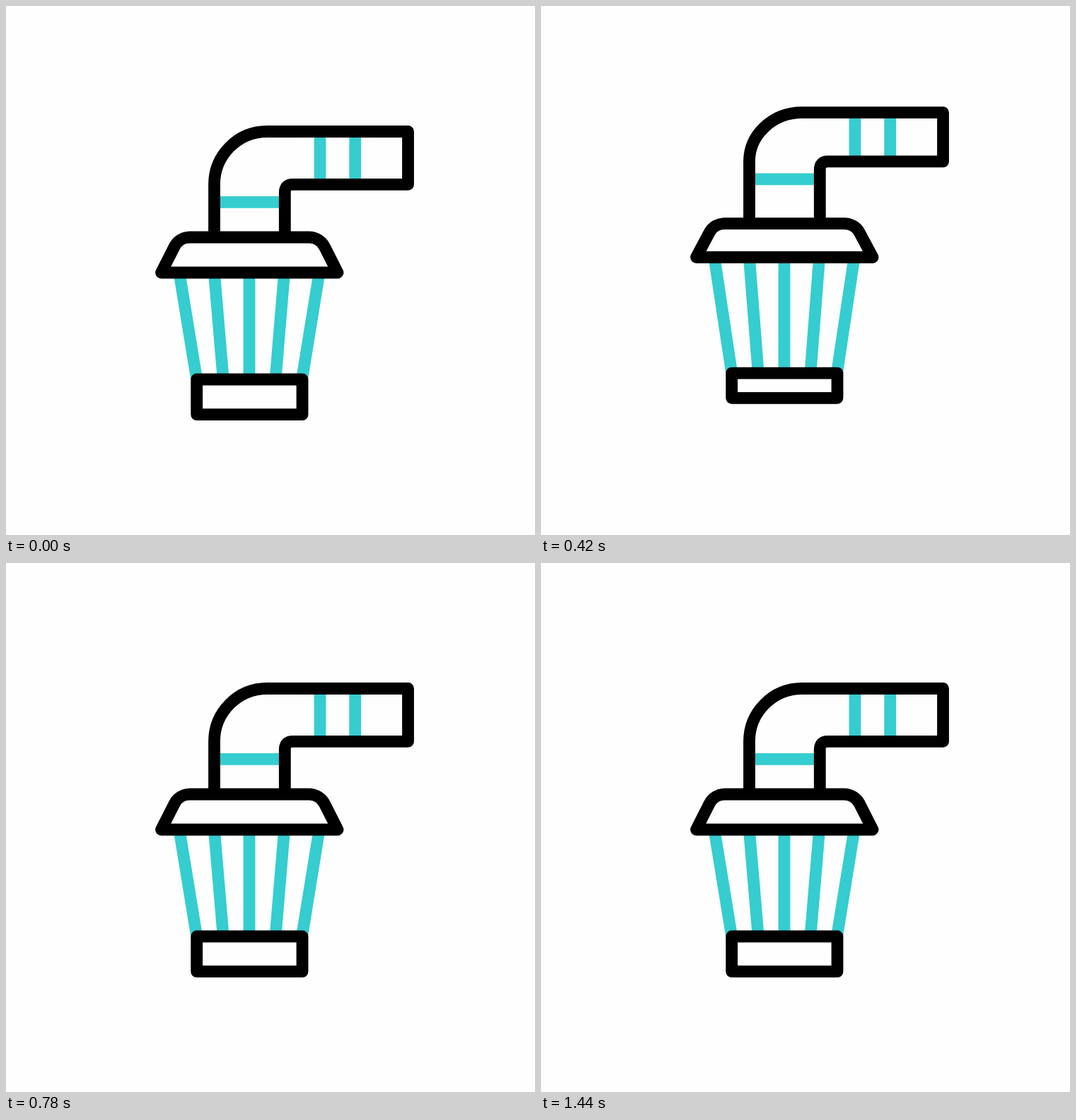
Write an HTML page that moves like this. It is 748 px wide and 748 px high and loops after 1500 ms.

```html
<!DOCTYPE html>
<html lang="en">
<head>
<meta charset="utf-8">
<title>Pipe</title>
<style>
  html, body { margin: 0; width: 100%; height: 100%; overflow: hidden; background: #fefefe; }
  svg { display: block; width: 100vw; height: 100vh; }
  path { fill: none; stroke: #000; stroke-width: 16.8; stroke-linejoin: round; }
  .blue { stroke: #35cdd0; }
  .puff { stroke-linecap: round; }
  .fill { fill: #fefefe; stroke: none; }
</style>
</head>
<body>
<svg viewBox="0 0 748 748">
  <clipPath id="area"><rect x="111" y="111" width="526" height="526"/></clipPath>
  <g clip-path="url(#area)">
    <path class="blue puff" pathLength="1" d="M566 206.5A41.5 41.5 0 0 0 607.5 165V96"/>
    <path class="blue puff" pathLength="1" d="M562 231.5H589A41.5 41.5 0 0 0 628 205"/>
  </g>
  <path id="inside" class="fill"/>
  <path id="bands" class="blue"/>
  <path id="pipe"/>
  <path id="ribs" class="blue"/>
  <path id="lid"/>
  <path id="base"/>
</svg>
<script>
const LOOP = 1500, STEP = 30;

// Heights: pipe top, pipe bottom, lid top, lid bottom, base top, base bottom
const rest = [177.5, 252.3, 327, 377, 528, 577.7];
const up = [138.3, 200, 288, 328, 507, 543.5];
const down = [177.5, 263, 349.7, 414, 545, 577.7];

const body = [[0, rest], [9, up], [9.68, up], [17, down], [21.5, rest]];
// Nozzle reach and visible share of the puffs
const blow = [[22, [0, 0]], [29, [19, 0.97]], [31.5, [20, 1]], [41, [0, 0]]];

const ribs = [[245, 269.7], [294.4, 307.2], [344, 344], [393.6, 381], [443, 418.5]];
const puffs = document.querySelectorAll('.puff');

function at(keys, n) {
  const i = keys.findIndex(k => k[0] > n);
  if (i === 0) return keys[0][1];
  if (i < 0) return keys[keys.length - 1][1];
  const [n0, a] = keys[i - 1], [n1, b] = keys[i];
  return a.map((v, k) => v + (b[k] - v) * (n - n0) / (n1 - n0));
}

function draw(id, d) {
  document.getElementById(id).setAttribute('d', d);
}

function pose(n) {
  const [top, low, lidTop, lidLow, baseTop, baseLow] = at(body, n);
  const [reach, share] = at(blow, n);
  const bend = low - (low - top) * 0.552;
  const h = lidLow - lidTop;
  const end = 568.5 + reach;

  const pipe = `M294.5 ${lidTop}V${low}C294.5 ${bend} 328 ${top} 369 ${top}` +
    `H${end}V${low}H405.5Q394.3 ${low} 394.3 ${low + 11.5}V${lidTop}`;
  draw('pipe', pipe);
  draw('inside', pipe);
  draw('bands', `M444 ${top}V${low}M493.7 ${top}V${low}M294.5 ${low + 25}H394.3`);
  draw('ribs', ribs.map(([a, b]) => `M${a} ${lidLow}L${b} ${baseTop}`).join(''));
  draw('lid', `M219.5 ${lidLow}L238.3 ${lidTop + h * 0.26}` +
    `C242.5 ${lidTop + h * 0.1} 251 ${lidTop} 260 ${lidTop}H428.5` +
    `C437.5 ${lidTop} 446 ${lidTop + h * 0.1} 450.2 ${lidTop + h * 0.26}` +
    `L469 ${lidLow}Z`);
  draw('base', `M269.7 ${baseTop}H419V${baseLow}H269.7Z`);

  puffs.forEach(p => {
    p.style.strokeDasharray = `${share} 2`;
    p.style.visibility = share > 0 ? 'visible' : 'hidden';
  });
}

function frame() {
  const tick = Math.floor(performance.now() % LOOP / STEP);
  // Every sixth tick repeats the pose before it
  pose(tick - Math.floor(Math.max(tick - 1, 0) / 6));
  requestAnimationFrame(frame);
}
frame();
</script>
</body>
</html>
```
